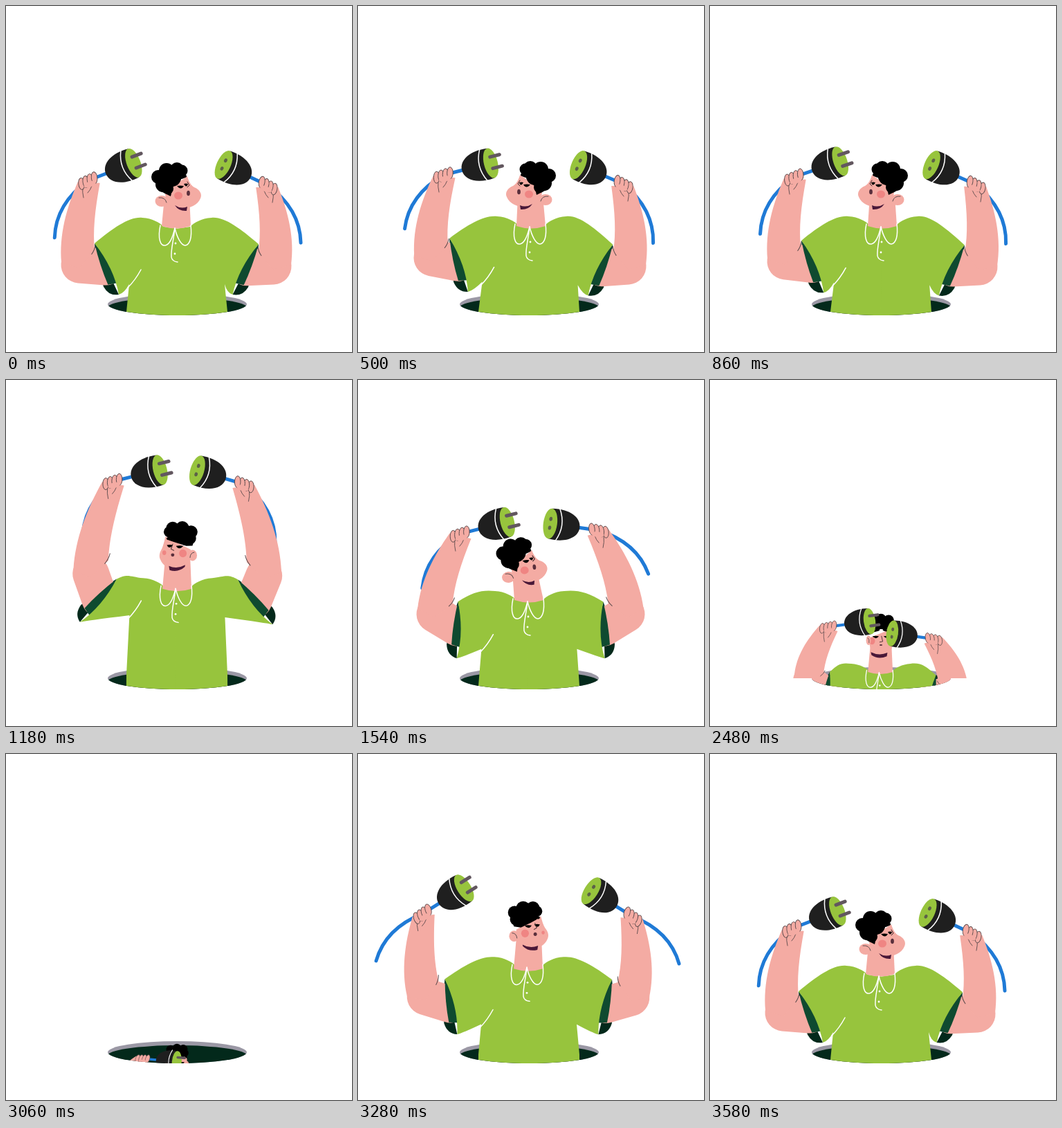
Animation of 500 by 500 pixels, one loop 3600 ms. Source, as an HTML page with a canvas:

```html
<!DOCTYPE html>
<html lang="en">
<head>
<meta charset="utf-8">
<title>Plug and socket</title>
<style>
html, body { margin: 0; width: 100%; height: 100%; overflow: hidden; background: #fff; }
canvas { display: block; }
</style>
</head>
<body>
<canvas id="stage" width="500" height="500"></canvas>
<script>
const ctx = document.getElementById('stage').getContext('2d');
const LOOP = 3600;
const SKIN = '#f4aba3', GREEN = '#97c43d', BLACK = '#1f1f1f', BLUE = '#1f7ad6',
      DEEP = '#03291b', CUFF = '#0f4a30', WINE = '#4a1838', LINE = '#5b4a4c';

// body: rise, scale, shoulder dx, dy; head: turn, dx, dy, tilt
// arm: elbow x, y, hand x, y, plug angle, cord angle (right arm is mirrored)
const pose = (body, head, left, right) => [...body, ...head, ...left, ...right];
const still = [0, 1, 0, 0];

const lookRight = pose(still, [1, 0, 0, 0],
  [106, 374, 119, 252, -21, 120.5], [108, 376, 116, 259, -25, 120]);
const turning = pose([0, 1, 2, -3], [0, 1, -4, 0],
  [104, 369, 108, 246, -27, 126], [104, 374, 103, 253, -28, 128]);
const lookLeft = pose([0, 1, 4, -2], [-1, 2, -2, 0],
  [107, 364, 124, 244, -14, 126], [104, 376, 111, 257, -23, 117]);
const lookLeft2 = pose([0, 1, 3, -2], [-1, 2, -2, 0],
  [109, 369, 122, 247, -19, 121], [105, 377, 110, 258, -24, 117]);
const joined = pose([-25, 1, 0, -4], [.1, 0, -4, 0],
  [130, 258, 172, 118, -11, 115], [130, 258, 172, 118, -11, 120]);
const apart = pose([0, 1, 1, -1], [1, -6, 1, -5],
  [111, 338, 148, 222, -14, 125], [106, 338, 147, 217, -8, 139]);
const settle = pose(still, [.7, -2, 0, 0],
  [106, 372, 118, 250, -22, 126], [106, 374, 116, 256, -24, 125]);
const front = pose([0, 1, 1, -4], [-.2, 0, -2, 0],
  [106, 373, 109, 253, -30, 116], [108, 375, 109, 258, -30, 116]);
const stretch = pose([-8, 1, 0, -4], [0, 0, -3, 0],
  [112, 352, 130, 232, -24, 118], [112, 354, 130, 236, -24, 118]);
const folded = pose([131, .7, 0, 0], [0, 0, 0, 0],
  [135, 320, 177, 252, 5, 95], [135, 345, 177, 290, 5, 95]);
const spread = pose([-8, 1, 0, -5], [.5, 0, -4, 0],
  [97, 356, 93, 238, -32, 135], [99, 358, 97, 242, -32, 135]);
const hidden = [185, ...folded.slice(1)];

const keys = [
  [0, lookRight], [250, turning], [500, lookLeft], [860, lookLeft2], [1000, lookLeft2],
  [1300, joined], [1540, apart], [1760, settle], [2120, front], [2300, stretch],
  [2670, hidden], [3010, hidden], [3060, folded], [3260, spread], [3480, lookRight], [LOOP, lookRight]
];

const slope = (i, c) => (keys[i + 1][1][c] - keys[i][1][c]) / (keys[i + 1][0] - keys[i][0]);

// Slope at a key, limited so that the curve never overshoots
function tangent(i, c) {
  if (i === 0 || i === keys.length - 1) return 0;
  const a = slope(i - 1, c), b = slope(i, c);
  return a * b <= 0 ? 0 : 2 * a * b / (a + b);
}

function poseAt(t) {
  let i = 0;
  while (t >= keys[i + 1][0]) i++;
  const [t0, from] = keys[i], [t1, to] = keys[i + 1];
  const span = t1 - t0, s = (t - t0) / span, q = 1 - s;
  return from.map((v, c) =>
    v * (1 + 2 * s) * q * q + to[c] * s * s * (3 - 2 * s) +
    span * s * q * (tangent(i, c) * q - tangent(i + 1, c) * s));
}

const rad = deg => deg * Math.PI / 180;
const along = (x, y, len, deg) => [x + len * Math.cos(rad(deg)), y + len * Math.sin(rad(deg))];

function fill(d, color) {
  ctx.fillStyle = color;
  ctx.fill(new Path2D(d));
}
function stroke(d, color, width) {
  ctx.strokeStyle = color;
  ctx.lineWidth = width;
  ctx.stroke(new Path2D(d));
}
function oval(x, y, rx, ry, color, tilt = 0, edge) {
  ctx.beginPath();
  ctx.ellipse(x, y, Math.max(rx, 0), Math.max(ry, 0), tilt, 0, 7);
  ctx.fillStyle = color;
  ctx.fill();
  if (edge) {
    ctx.strokeStyle = edge;
    ctx.lineWidth = .9;
    ctx.stroke();
  }
}
function group(draw) {
  ctx.save();
  draw();
  ctx.restore();
}
const mirror = () => ctx.transform(-1, 0, 0, 1, 494, 0);

// Sleeve opening, carried by the upper arm
function cuffOf([ex, ey]) {
  const turn = Math.atan2(ey - 335, ex - 175) - Math.atan2(39, -69);
  const c = Math.cos(turn), s = Math.sin(turn);
  const spin = (x, y) => [ex + x * c - y * s, ey + x * s + y * c];
  const top = spin(22, -31), low = spin(57, 43);
  const dx = low[0] - top[0], dy = low[1] - top[1], len = Math.hypot(dx, dy);
  const at = (k, out) => [top[0] + dx * k - dy / len * out, top[1] + dy * k + dx / len * out];
  return { top, low, at };
}

function drawArm(arm) {
  const [ex, ey, hx, hy, tilt, swing] = arm;
  const { top, low, at } = cuffOf(arm);
  stroke(`M${along(hx, hy, 32, tilt)}L${hx},${hy}Q${along(hx, hy, 58, swing + 24)} ${along(hx, hy, 96, swing)}`, BLUE, 5);
  fill(`M${top}Q${at(.4, 12)} ${at(.76, 15)}Q${at(.95, 14)} ${low}Z`, DEEP);
  stroke(`M${ex},${ey}L${at(.46, 0)}`, SKIN, 53);
  const len = Math.hypot(hx - ex, hy - ey), ux = (hx - ex) / len, uy = (hy - ey) / len, k = len / 122;
  group(() => {
    ctx.transform(-uy, ux, ux * k, uy * k, ex, ey);
    fill('M-26,0C-34,40 -27,80 -15,118L17,120C14,80 14,50 20,22L0,-5Z', SKIN);
    stroke('M20,31Q20,24 16,17', LINE, 1);
  });
  fill(`M${top}Q${at(.4, 7)} ${at(.76, 8)}L${at(.8, -4)}L${at(.5, -10)}Z`, CUFF);
}

function drawShirtHalf(arm, dx, dy, seam) {
  const { top, low, at } = cuffOf(arm);
  const [x, y] = top, px = 197 + dx, py = 306 + dy;
  const pit = [178 + dx * .4, 402 + (low[1] - 417) * .9];
  fill(`M${top}C${x + .4 * (px - x)},${y + .4 * (py - y) - 8} ${px - 18},${py - 2} ${px},${py}
    C${px + 15},${py + 1} ${px + 25},${py + 7} ${px + 31},${py + 13}L${249 + dx},${322 + dy}
    L250,760L172,760L174,442L${pit}Q${low[0] + 8},${low[1] - 2} ${low}Q${at(.55, -10)} ${top}Z`, GREEN);
  if (seam) stroke(`M${pit[0] - 2},${pit[1] + 5}Q${pit[0] + 9},${pit[1] - 6} ${pit[0] + 17},${pit[1] - 21}`, '#fff', 1.5);
}

function drawCollar(dx, dy) {
  group(() => {
    ctx.translate(dx, dy);
    stroke('M223,317C219,336 223,347 230,346C236,345 241,334 244,321C247,334 253,346 259,346C266,345 269,334 267,317', '#fff', 1.5);
    stroke('M244,321C242,340 238,352 239,363Q240,369 248,370', '#fff', 1.5);
    oval(245, 343, 1.4, 1.4, '#fff');
    oval(244, 358, 1.4, 1.4, '#fff');
  });
}

function drawGrip([, , hx, hy, tilt], hasProngs) {
  group(() => {
    ctx.translate(...along(hx, hy, 70, tilt));
    ctx.rotate(rad(tilt));
    fill('M0,-22C-25,-25 -43,-15 -43,0C-43,15 -25,25 0,22Z', BLACK);
    stroke('M-11,-23Q-23,0 -11,23', '#fff', 1.5);
    oval(0, 0, 10, 22, GREEN);
    for (const y of [-9, 8]) {
      if (hasProngs) stroke(`M1,${y}H15`, '#62575f', 5);
      else oval(0, y * .75, 2.3, 3, '#5c6148');
    }
  });
  group(() => {
    ctx.translate(hx, hy);
    stroke('M-8,8Q-9,18 -7,25M5,8Q3,14 -1,18', LINE, .9);
    ctx.rotate(rad(tilt));
    for (let i = 0; i < 4; i++) oval(i * 6.8 - 11, 1 - i * .5, 4.3, 8.5, SKIN, .25, LINE);
    oval(0, 6, 9, 4, SKIN);
  });
}

// Front and side views of the head, blended by the turn
const faceFront = [267, 246, 268, 252, 268, 258, 268, 264, 268, 272, 267, 276, 265, 280,
  261, 290, 254, 293, 247, 293, 236, 293, 227, 285, 227, 262];
const faceSide = [262, 246, 264, 254, 268, 260, 272, 262, 280, 265, 284, 272, 281, 278,
  277, 288, 265, 292, 255, 293, 240, 294, 230, 288, 230, 268];
const curls = [
  [[234, 233, 9], [220, 247, 10]], [[247, 230, 9], [232, 238, 11]], [[260, 232, 9], [247, 236, 10]],
  [[264, 240, 7], [254, 238, 8.5]], [[231, 241, 7], [227, 258, 11]], [[248, 238, 9], [240, 248, 13]],
  [[237, 241, 7], [234, 264, 8]]
];

function drawHead(turn, dx, dy, tilt, bodyX) {
  const side = Math.abs(turn);
  const mix = (a, b) => a.map((v, i) => v + (b[i] - v) * side);
  fill(`M${229 + dx},${276 + dy}L${265 + dx},${276 + dy}L${267 + bodyX},318Q${246 + bodyX},325 ${225 + bodyX},318Z`, SKIN);
  group(() => {
    ctx.translate(dx + 247, dy + 300);
    ctx.rotate(rad(tilt));
    ctx.translate(-247, -300);
    if (turn < 0) mirror();
    oval(...mix([268, 265, 4, 8], [258, 268, 4, 8]), SKIN);
    const f = mix(faceFront, faceSide);
    fill(`M${f.slice(0, 2)}C${f.slice(2)}Z`, SKIN);
    const s = mix([230, 286, 244, 293, 258, 287, 257, 293, 243, 299, 231, 291],
                  [244, 288, 253, 294, 262, 290, 261, 296, 250, 297, 244, 288]);
    fill(`M${s.slice(0, 2)}Q${s.slice(2, 6)}L${s.slice(6, 8)}Q${s.slice(8)}Z`, WINE);

    oval(...mix([232, 267, 5, 6], [249, 274, 6, 5.5]), '#ef8583');
    oval(...mix([262, 267, 5, 6], [272, 272, 0, 0]), '#ef8583');
    for (const [a, b] of curls) {
      const [x, y, r] = mix(a, b);
      oval(x, y, r, r, '#000');
    }
    fill(`M${mix([226, 235, 268, 235, 268, 252, 262, 247, 232, 247, 227, 252],
                 [214, 250, 260, 240, 250, 250, 241, 262, 238, 275, 224, 268])}Z`, '#000');
    oval(...mix([226, 266, 4, 8], [225, 282, 9.5, 8]), SKIN);
    const e = mix([225, 262, 228, 264, 227, 270], [221, 277, 230, 276, 232, 284]);
    stroke(`M${e.slice(0, 2)}Q${e.slice(2)}`, LINE, 1);

    const brows = [mix([232, 251, 243, 248], [243, 257, 251, 250]), mix([252, 248, 263, 251], [254, 248, 259, 246])];
    for (const b of brows) stroke(`M${b.slice(0, 2)}L${b.slice(2)}`, '#000', 4);
    for (const [x, y, r] of [mix([238, 260, 5.5], [252, 261, 5]), mix([257, 260, 5.5], [260, 258, 3])])
      fill(`M${x - r},${y - 1}Q${x},${y - 2} ${x + r},${y - 1}Q${x + 1},${y + 6} ${x - r},${y - 1}Z`, '#000');
    const n = mix([248, 259, 250, 268, 245, 269], [262, 254, 265, 259, 262, 262]);
    stroke(`M${n.slice(0, 2)}L${n.slice(2)}`, '#3b2528', 1);
    oval(...mix([247, 274, 2.5, 1.3], [263.5, 270.5, 2.4, 3.8]), '#5a2f3c');
  });
}

function draw(t) {
  const p = poseAt(t);
  const [rise, scale, dx, dy, turn, hx, hy, tilt] = p;
  const left = p.slice(8, 14), right = p.slice(14);
  ctx.fillStyle = '#fff';
  ctx.fillRect(0, 0, 500, 500);
  ctx.lineCap = ctx.lineJoin = 'round';

  oval(247.5, 431, 100.5, 16, '#9b98a5');
  group(() => {
    ctx.clip(new Path2D('M147,431A100.5,16 0 0 1 348,431A100.5,16 0 0 1 147,431Z'));
    oval(247.5, 436, 101, 15, DEEP);
  });

  group(() => {
    ctx.clip(new Path2D('M0,0H500V431H348A100.5,16 0 0 1 147,431H0Z'));
    ctx.translate(247, 446 + rise);
    ctx.scale(scale, scale);
    ctx.translate(-247, -446);
    drawArm(left);
    group(() => { mirror(); drawArm(right); });
    drawShirtHalf(left, dx, dy, true);
    group(() => { mirror(); drawShirtHalf(right, -dx, dy, false); });
    drawHead(turn, hx, hy, tilt, dx);
    drawCollar(dx, dy);
    group(() => { mirror(); drawGrip(right, false); });
    drawGrip(left, true);
  });
}

const start = performance.now();
function frame() {
  draw((performance.now() - start) % LOOP);
  requestAnimationFrame(frame);
}
frame();
</script>
</body>
</html>
```
